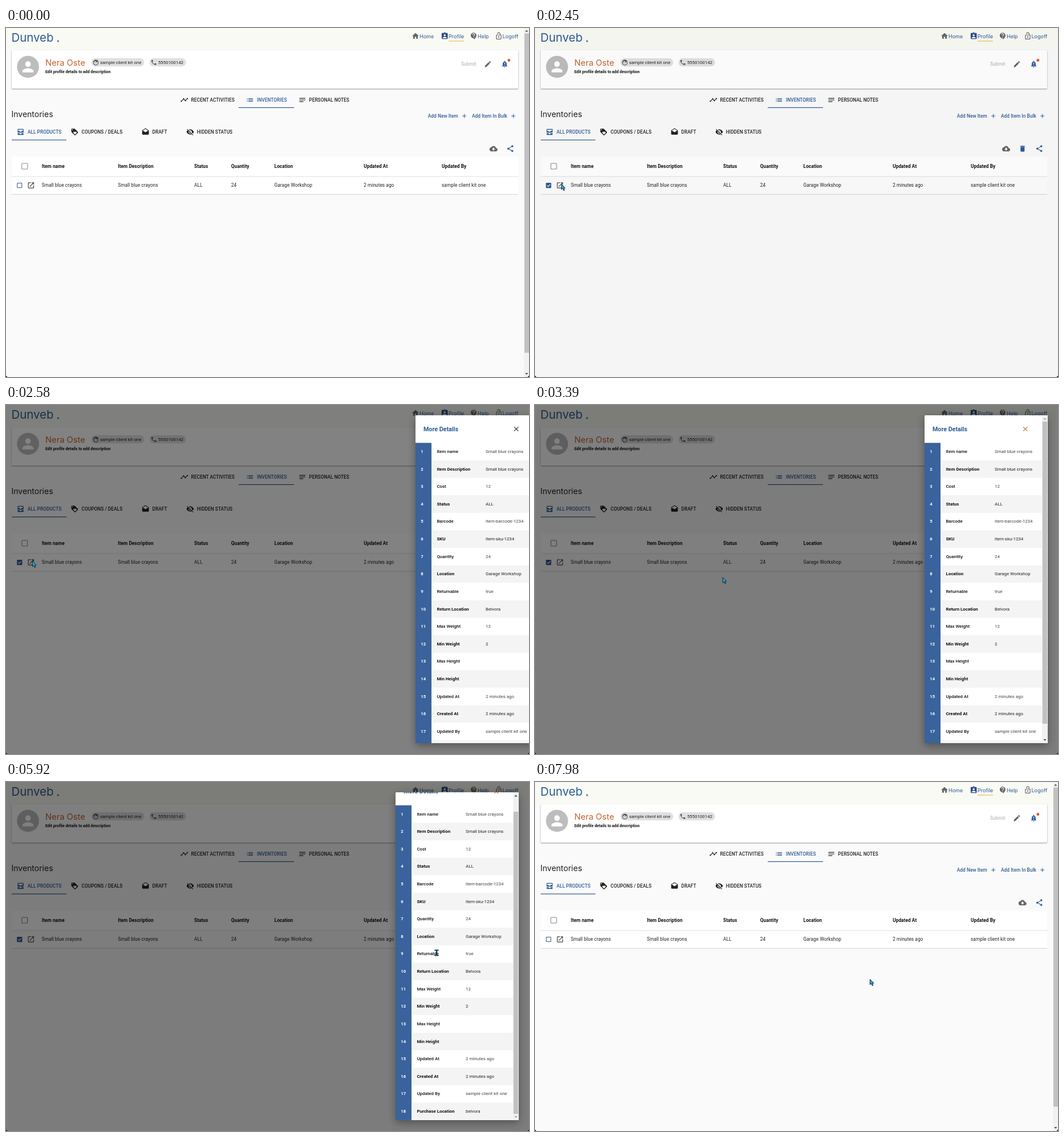
Recreate the animation shown at these times as an HTML page. Size 917x611 px, loop 8000 ms.

```html
<!DOCTYPE html>
<html lang="en">
<head>
<meta charset="utf-8">
<title>Inventories</title>
<style>
html, body { margin: 0; width: 100%; height: 100%; overflow: hidden; background: #fafafa; }
svg { display: block; width: 917px; height: 611px; }
text { font-family: Roboto, Arial, sans-serif; white-space: pre; }
.geo { font-family: Inter, "Open Sans", sans-serif; }
.ui { letter-spacing: .0107em; }
.card { filter: drop-shadow(0 1px .8px rgba(0,0,0,.4)); }
.sheet { filter: drop-shadow(0 4px 7px rgba(0,0,0,.35)); }
</style>
</head>
<body>
<svg id="stage" viewBox="0 0 917 611"></svg>
<script>
const INK = '#212121', BLUE = '#2f5b96', GREY = '#666', ORANGE = '#c6602f';
const OWNER = 'sample client kit one', SHOP = 'Belvora';

const ICONS = {
  home: 'M10 20v-6h4v6h5v-8h3L12 3 2 12h3v8z',
  badge: 'M19 3h-4.18C14.4 1.84 13.3 1 12 1c-1.3 0-2.4.84-2.82 2H5c-1.1 0-2 .9-2 2v14c0 1.1.9 2 2 2h14c1.1 0 2-.9 2-2V5c0-1.1-.9-2-2-2zm-7 0c.55 0 1 .45 1 1s-.45 1-1 1-1-.45-1-1 .45-1 1-1zm0 4c1.66 0 3 1.34 3 3s-1.34 3-3 3-3-1.34-3-3 1.34-3 3-3zm6 12H6v-1.4c0-2 4-3.1 6-3.1s6 1.1 6 3.1V19z',
  help: 'M11.5 2C6.81 2 3 5.81 3 10.5S6.81 19 11.5 19h.5v3c4.86-2.34 8-7 8-11.5C20 5.81 16.19 2 11.5 2zm1 14.5h-2v-2h2v2zm0-3.5h-2c0-3.25 3-3 3-5 0-1.1-.9-2-2-2s-2 .9-2 2h-2c0-2.21 1.79-4 4-4s4 1.79 4 4c0 2.5-3 2.75-3 5z',
  lock: 'M12 17c1.1 0 2-.9 2-2s-.9-2-2-2-2 .9-2 2 .9 2 2 2zm6-9h-1V6c0-2.76-2.24-5-5-5S7 3.24 7 6h1.9c0-1.71 1.39-3.1 3.1-3.1 1.71 0 3.1 1.39 3.1 3.1v2H6c-1.1 0-2 .9-2 2v10c0 1.1.9 2 2 2h12c1.1 0 2-.9 2-2V10c0-1.1-.9-2-2-2zm0 12H6V10h12v10z',
  person: 'M12 12c2.21 0 4-1.79 4-4s-1.79-4-4-4-4 1.79-4 4 1.79 4 4 4zm0 2c-2.67 0-8 1.34-8 4v2h16v-2c0-2.66-5.33-4-8-4z',
  face: 'M9 11.75a1.25 1.25 0 100 2.5 1.25 1.25 0 000-2.5zm6 0a1.25 1.25 0 100 2.5 1.25 1.25 0 000-2.5zM12 2C6.48 2 2 6.48 2 12s4.48 10 10 10 10-4.48 10-10S17.52 2 12 2zm0 18c-4.41 0-8-3.59-8-8 0-.29.02-.58.05-.86 2.36-1.05 4.23-2.98 5.21-5.37C11.07 8.33 14.05 10 17.42 10c.78 0 1.53-.09 2.25-.26.21.71.33 1.47.33 2.26 0 4.41-3.59 8-8 8z',
  phone: 'M6.62 10.79c1.44 2.83 3.76 5.14 6.59 6.59l2.2-2.2c.27-.27.67-.36 1.02-.24 1.12.37 2.33.57 3.57.57.55 0 1 .45 1 1V20c0 .55-.45 1-1 1-9.39 0-17-7.61-17-17 0-.55.45-1 1-1h3.5c.55 0 1 .45 1 1 0 1.25.2 2.45.57 3.57.11.35.03.74-.25 1.02l-2.2 2.2z',
  pencil: 'M3 17.25V21h3.75L17.81 9.94l-3.75-3.75L3 17.25zM20.71 7.04c.39-.39.39-1.02 0-1.41l-2.34-2.34c-.39-.39-1.02-.39-1.41 0l-1.83 1.83 3.75 3.75 1.83-1.83z',
  bell: 'M18 16v-5c0-3.07-1.64-5.64-4.5-6.32V4c0-.83-.67-1.5-1.5-1.5s-1.5.67-1.5 1.5v.68C7.63 5.36 6 7.92 6 11v5l-2 2v1h16v-1l-2-2zm-5 0h-2v-2h2v2zm0-4h-2V8h2v4zm-1 10c1.1 0 2-.9 2-2h-4c0 1.1.89 2 2 2z',
  trend: 'M23 8c0 1.1-.9 2-2 2-.18 0-.35-.02-.51-.07l-3.56 3.55c.05.16.07.34.07.52 0 1.1-.9 2-2 2s-2-.9-2-2c0-.18.02-.36.07-.52l-2.55-2.55c-.16.05-.34.07-.52.07s-.36-.02-.52-.07l-4.55 4.56c.05.16.07.33.07.51 0 1.1-.9 2-2 2s-2-.9-2-2 .9-2 2-2c.18 0 .35.02.51.07l4.56-4.55C8.02 9.36 8 9.18 8 9c0-1.1.9-2 2-2s2 .9 2 2c0 .18-.02.36-.07.52l2.55 2.55c.16-.05.34-.07.52-.07s.36.02.52.07l3.55-3.56C19.02 8.35 19 8.18 19 8c0-1.1.9-2 2-2s2 .9 2 2z',
  list: 'M3 13h2v-2H3v2zm0 4h2v-2H3v2zm0-8h2V7H3v2zm4 4h14v-2H7v2zm0 4h14v-2H7v2zM7 7v2h14V7H7z',
  notes: 'M3 18h12v-2H3v2zM3 6v2h18V6H3zm0 7h18v-2H3v2z',
  plus: 'M19 13h-6v6h-2v-6H5v-2h6V5h2v6h6v2z',
  inbox: 'M19 3H5c-1.1 0-2 .9-2 2v7c0 1.1.9 2 2 2h14c1.1 0 2-.9 2-2V5c0-1.1-.9-2-2-2zm0 6h-4c0 1.62-1.38 3-3 3s-3-1.38-3-3H5V5h14v4zm-4 7h6v3c0 1.1-.9 2-2 2H5c-1.1 0-2-.9-2-2v-3h6c0 1.66 1.34 3 3 3s3-1.34 3-3z',
  tag: 'M21.41 11.58l-9-9C12.05 2.22 11.55 2 11 2H4c-1.1 0-2 .9-2 2v7c0 .55.22 1.05.59 1.42l9 9c.36.36.86.58 1.41.58.55 0 1.05-.22 1.41-.59l7-7c.37-.36.59-.86.59-1.41 0-.55-.23-1.06-.59-1.42zM5.5 7C4.67 7 4 6.33 4 5.5S4.67 4 5.5 4 7 4.67 7 5.5 6.33 7 5.5 7zm11.77 8.27L13 19.54l-4.27-4.27C8.28 14.81 8 14.19 8 13.5c0-1.38 1.12-2.5 2.5-2.5.69 0 1.32.28 1.77.74l.73.72.73-.73c.45-.45 1.08-.73 1.77-.73 1.38 0 2.5 1.12 2.5 2.5 0 .69-.28 1.32-.73 1.77z',
  draft: 'M21.99 8c0-.72-.37-1.35-.94-1.7L12 1 2.95 6.3C2.38 6.65 2 7.28 2 8v10c0 1.1.9 2 2 2h16c1.1 0 2-.9 2-2l-.01-10zM12 13L3.74 7.84 12 3l8.26 4.84L12 13z',
  hidden: 'M12 7c2.76 0 5 2.24 5 5 0 .65-.13 1.26-.36 1.83l2.92 2.92c1.51-1.26 2.7-2.89 3.43-4.75-1.73-4.39-6-7.5-11-7.5-1.4 0-2.74.25-3.98.7l2.16 2.16C10.74 7.13 11.35 7 12 7zM2 4.27l2.74 2.74C3.08 8.3 1.78 10.02 1 12c1.73 4.39 6 7.5 11 7.5 1.55 0 3.03-.3 4.38-.84l.42.42L19.73 22 21 20.73 3.27 3 2 4.27zM7.53 9.8l1.55 1.55c-.05.21-.08.43-.08.65 0 1.66 1.34 3 3 3 .22 0 .44-.03.65-.08l1.55 1.55c-.67.33-1.41.53-2.2.53-2.76 0-5-2.24-5-5 0-.79.2-1.53.53-2.2zm4.31-.78l3.15 3.15.02-.16c0-1.66-1.34-3-3-3l-.17.01z',
  cloud: 'M19.35 10.04C18.67 6.59 15.64 4 12 4 9.11 4 6.6 5.64 5.35 8.04 2.34 8.36 0 10.91 0 14c0 3.31 2.69 6 6 6h13c2.76 0 5-2.24 5-5 0-2.64-2.05-4.78-4.65-4.96zM17 13l-5 5-5-5h3V9h4v4h3z',
  trash: 'M6 19c0 1.1.9 2 2 2h8c1.1 0 2-.9 2-2V7H6v12zM19 4h-3.5l-1-1h-5l-1 1H5v2h14V4z',
  share: 'M18 16.08c-.76 0-1.44.3-1.96.77L8.91 12.7c.05-.23.09-.46.09-.7s-.04-.47-.09-.7l7.05-4.11c.54.5 1.25.81 2.04.81 1.66 0 3-1.34 3-3s-1.34-3-3-3-3 1.34-3 3c0 .24.04.47.09.7L8.04 9.81C7.5 9.31 6.79 9 6 9c-1.66 0-3 1.34-3 3s1.34 3 3 3c.79 0 1.5-.31 2.04-.81l7.12 4.16c-.05.21-.08.43-.08.65 0 1.61 1.31 2.92 2.92 2.92s2.92-1.31 2.92-2.92-1.31-2.92-2.92-2.92z',
  open: 'M19 19H5V5h7V3H5c-1.11 0-2 .9-2 2v14c0 1.1.89 2 2 2h14c1.1 0 2-.9 2-2v-7h-2v7zM14 3v2h3.59l-9.83 9.83 1.41 1.41L19 6.41V10h2V3h-7z',
  close: 'M19 6.41L17.59 5 12 10.59 6.41 5 5 6.41 10.59 12 5 17.59 6.41 19 12 13.41 17.59 19 19 17.59 13.41 12z'
};

const text = (x, y, str, size, fill = INK, weight = 400, cls = '') =>
  `<text x="${x}" y="${y}" font-size="${size}" fill="${fill}" font-weight="${weight}" class="${cls}">${str}</text>`;
const ui = (x, y, str, fill, weight = 500) => text(x, y, str, 8.22, fill, weight, 'ui');
const rect = (x, y, w, h, fill, extra = '') =>
  `<rect x="${x}" y="${y}" width="${w}" height="${h}" fill="${fill}" ${extra}/>`;
const path = (d, fill, extra = '') => `<path d="${d}" fill="${fill}" ${extra}/>`;
// Icons are placed by their centre.
const icon = (name, cx, cy, fill = INK, size = 14.1, extra = '') =>
  `<g transform="translate(${cx - size / 2} ${cy - size / 2}) scale(${size / 24})" ${extra}>${path(ICONS[name], fill)}</g>`;
const group = (id, body, extra = '') => `<g id="${id}" ${extra}>${body}</g>`;
const arrow = (id, x, y, dir) => path(`M${x - 2.6} ${y + dir * 1.4}h5.2l-2.6 ${-dir * 2.8}z`, '#505050', `id="${id}"`);

function header() {
  const nav = [['home', 718, 725, 'Home', GREY], ['badge', 769.2, 776, 'Profile', '#2b4a86'],
    ['help', 820.2, 827, 'Help', GREY], ['lock', 864, 870.5, 'Logoff', GREY]];
  return rect(0, 0, 917, 38, '#f9faf4') +
    text(9.5, 23.5, 'Dunveb', 20.4, BLUE, 400, 'geo') +
    '<circle cx="91.3" cy="23" r="1.7" fill="#5b7ba8"/>' +
    nav.map(([name, cx, x, label, fill]) => icon(name, cx, 14, fill) + text(x, 18.2, label, 9, BLUE, 400, 'geo')).join('') +
    rect(776, 22.4, 27, 1.1, '#f0b545');
}

function profile() {
  const chip = (x, w, name, label) => rect(x, 53, w, 14.3, '#e0e0e0', 'rx="7.1"') +
    icon(name, x + 7.7, 60.4, '#555', 11.6) + text(x + 15.2, 63, label, 7.9);
  return rect(10, 39, 888, 67, '#fff', 'rx="1.5" class="card"') +
    '<circle cx="38.6" cy="68" r="19.3" fill="#bdbdbd"/>' + icon('person', 38.6, 68, '#fff', 29) +
    text(69, 66, 'Nera Oste', 14.7, ORANGE, 400, 'geo') +
    text(69, 79.3, 'Edit profile details to add description', 6.95, '#111', 600) +
    chip(149.8, 92.4, 'face', OWNER) + chip(251.5, 64.2, 'phone', '5550100142') +
    ui(798, 66, 'Submit', '#bdbdbd') + icon('pencil', 845, 63.2, GREY) + icon('bell', 874.4, 63.2, '#3362a0') +
    '<circle cx="881.8" cy="56.5" r="2.4" fill="#d9542b"/>';
}

function tabs() {
  const row = [['trend', 312.7, 324.5, 'RECENT ACTIVITIES', 126, INK], ['list', 427.8, 440, 'INVENTORIES', 126, BLUE],
    ['notes', 519.6, 531.3, 'PERSONAL NOTES', 126, INK], ['inbox', 25.6, 37.8, 'ALL PRODUCTS', 182, BLUE],
    ['tag', 120.4, 132.5, 'COUPONS / DEALS', 182, INK], ['draft', 244.6, 256.5, 'DRAFT', 182, INK],
    ['hidden', 323, 334.8, 'HIDDEN STATUS', 182, INK]];
  return row.map(([name, cx, x, label, y, fill]) => icon(name, cx, y, fill) + ui(x, y + 2.8, label, fill)).join('') +
    rect(408, 138.8, 97, 1.2, BLUE) + rect(10, 195.4, 96, 1.2, BLUE) +
    text(9.5, 156.3, 'Inventories', 14, INK, 400, 'geo') +
    ui(739.8, 157, 'Add New Item', BLUE) + icon('plus', 803.6, 154, BLUE, 12) +
    ui(817, 157, 'Add Item In Bulk', BLUE) + icon('plus', 889.6, 154, BLUE, 12);
}

function table() {
  const cols = [[62.7, 'Item name', 'Small blue crayons'], [196.2, 'Item Description', 'Small blue crayons'],
    [330, 'Status', 'ALL'], [394.7, 'Quantity', '24'], [470.6, 'Location', 'Garage Workshop'],
    [627.2, 'Updated At', '2 minutes ago'], [764, 'Updated By', OWNER]];
  return icon('cloud', 826, 211.2, GREY, 14.1, 'id="cloud"') + icon('trash', 854.8, 211.2, BLUE, 14.1, 'id="trash"') +
    icon('share', 884.2, 211.2, BLUE) +
    rect(10, 225, 888, 66, '#fff') + rect(10, 260, 888, 31, '#000', 'id="hover" fill-opacity=".012"') +
    rect(10, 259.5, 888, 1, '#e0e0e0') + rect(10, 290.8, 888, 1, '#d2d2d2') +
    rect(27.8, 237, 10, 10, 'none', 'rx="1" stroke="#8a8a8a" stroke-width="1.1"') +
    rect(19.8, 271.5, 8, 8, 'none', 'rx=".8" stroke="#44597a" stroke-width="1.1" id="empty"') +
    group('ticked', rect(19.2, 271, 9.2, 9.2, BLUE, 'rx="1.2"') +
      '<path d="M21.2 275.6l1.9 1.9 3.6-3.7" fill="none" stroke="#fff" stroke-width="1.1"/>') +
    icon('open', 43.8, 275.5, '#444') +
    cols.map(([x, head, cell]) => ui(x, 244.8, head, '#111', 600) + ui(x, 278, cell, INK, 400)).join('');
}

function pageBar() {
  return group('pageBar', rect(908, 0, 9, 611, '#f1f1f1') + rect(909, 9.5, 8, 559, '#c1c1c1') +
    arrow('', 912.8, 5, 1) + arrow('', 912.8, 605.5, -1));
}

function panel() {
  const rows = [['Item name', 'Small blue crayons'], ['Item Description', 'Small blue crayons'], ['Cost', '12'],
    ['Status', 'ALL'], ['Barcode', 'item-barcode-1234'], ['SKU', 'item-sku-1234'], ['Quantity', '24'],
    ['Location', 'Garage Workshop'], ['Returnable', 'true'], ['Return Location', SHOP], ['Max Weight', '12'],
    ['Min Weight', '2'], ['Max Height', ''], ['Min Height', ''], ['Updated At', '2 minutes ago'],
    ['Created At', '2 minutes ago'], ['Updated By', OWNER], ['Purchase Location', SHOP.toLowerCase()]];
  const pitch = 30.62;
  const body = rows.map(([label, value], i) => {
    const y = 66.3 + i * pitch, base = y + 17.7, even = i % 2;
    return (even ? rect(711, y, 178, pitch, '#f4f4f4') : '') +
      text(692.3, base, i + 1, 7.7, '#fff', 600) +
      text(720.4, base, label, 7.9, '#111', even ? 700 : 500) +
      text(806, base, value, 7.92, even ? '#222' : '#444');
  }).join('');
  const content = rect(683, 66.3, 28, rows.length * pitch, '#3a629c') + body +
    text(697, 45.7, 'More Details', 10.7, BLUE, 600) + icon('close', 859.7, 42, '#c5702c', 14.1, 'id="close"');
  return group('panel', rect(683, 18, 216, 574, '#fff', 'rx="1.5" class="sheet"') +
    `<g clip-path="url(#sheetClip)">${group('content', content)}</g>` +
    rect(889, 18, 10, 574, '#f1f1f1') + rect(889.8, 29, 8.2, 529, '#c1c1c1', 'id="thumb"') +
    arrow('up', 894, 24, 1) + arrow('down', 894, 586.5, -1));
}

const pointer = group('pointer', '<circle id="ring" r="7.6" fill="#d6d42c" fill-opacity=".82"/>' +
  path('M.4 .4v9.4l2.2-2 1.7 3.8 1.6-.7-1.7-3.6h2.8z', '#14b4e4', 'id="arrow" stroke="#101820" stroke-width=".9"') +
  path('M-3.6 -5.6h7.2v2h-2.4v7.2h2.4v2h-7.2v-2h2.4v-7.2h-2.4z', '#12414f', 'id="beam"'));

document.getElementById('stage').innerHTML =
  '<clipPath id="sheetClip"><rect x="683" y="18" width="206" height="574"/></clipPath>' +
  rect(0, 0, 917, 611, '#fafafa') + header() + profile() + tabs() + table() + pageBar() +
  rect(0, 0, 917, 611, '#000', 'id="shade"') + panel() + pointer +
  path('M0 608.5v2.5h2.5zM917 608.5v2.5h-2.5z', '#111');

const el = {};
document.querySelectorAll('[id]').forEach(node => el[node.id] = node);

// Tables of [tick, values...]; values run straight from one row to the next.
const TICK = 66.5;
const MOVES = [[1, 150, 593], [5, 27, 275], [7, 27, 275], [9, 83, 232], [20, 83, 232], [26, 46, 273], [46, 46, 273],
  [55, 555, 324], [71, 555, 324], [72, 582, 305], [79, 746, 264], [84, 746, 264], [89, 755, 299], [91, 755, 299],
  [97, 759, 309], [101, 759, 309], [107, 567, 359], [118, 567, 359], [120, 587, 345]];
const SCROLL = [[79, 0], [84, 25.5], [91, 25.5], [97, 0]];
const SHADE = [[36, 0], [37, .02], [38, .36], [39, .49], [40, .5]];
const SLIDE = [[37, 234], [38, 96], [39, 35], [40, 0]];

function at(rows, n) {
  const i = rows.findIndex(row => row[0] > n);
  if (i === 0) return rows[0].slice(1);
  if (i < 0) return rows[rows.length - 1].slice(1);
  const a = rows[i - 1], b = rows[i], p = (n - a[0]) / (b[0] - a[0]);
  return a.slice(1).map((v, k) => v + (b[k + 1] - v) * p);
}

const show = (node, on) => node.setAttribute('visibility', on ? 'visible' : 'hidden');
const move = (node, x, y) => node.setAttribute('transform', `translate(${x} ${y})`);
const within = (n, from, to) => n >= from && n < to;

function draw(time) {
  const n = Math.floor((time + 16) / TICK);
  const [x, y] = at(MOVES, n), [scroll] = at(SCROLL, n);
  const modal = within(n, 37, 116), picked = within(n, 6, 116);
  const overText = modal && x > 711;

  show(el.ticked, picked);
  show(el.empty, !picked);
  show(el.trash, picked);
  el.cloud.setAttribute('transform', `translate(${picked ? 818.95 : 847.75} 204.15) scale(${14.1 / 24})`);
  show(el.hover, within(n, 24, 116));
  show(el.pageBar, !modal);

  el.shade.setAttribute('fill-opacity', modal ? at(SHADE, n)[0] : 0);
  show(el.panel, within(n, 38, 116));
  move(el.panel, at(SLIDE, n)[0], 0);
  move(el.content, 0, -scroll);
  move(el.thumb, 0, scroll * 23 / 25.5);
  el.close.firstChild.setAttribute('fill', n < 40 ? '#3a2a20' : '#c5702c');
  el.up.setAttribute('fill', scroll > 0 ? '#34487a' : '#a3a3a3');
  el.down.setAttribute('fill', scroll < 25 ? '#505050' : '#a3a3a3');

  const shown = n >= 1;
  move(el.pointer, x, y);
  show(el.arrow, shown && !overText);
  show(el.beam, shown && overText);
  show(el.ring, within(n, 5, 7) || within(n, 35, 37) || within(n, 114, 116));
}

const start = performance.now();
function loop() {
  draw((performance.now() - start) % 8000);
  requestAnimationFrame(loop);
}
loop();
</script>
</body>
</html>
```
